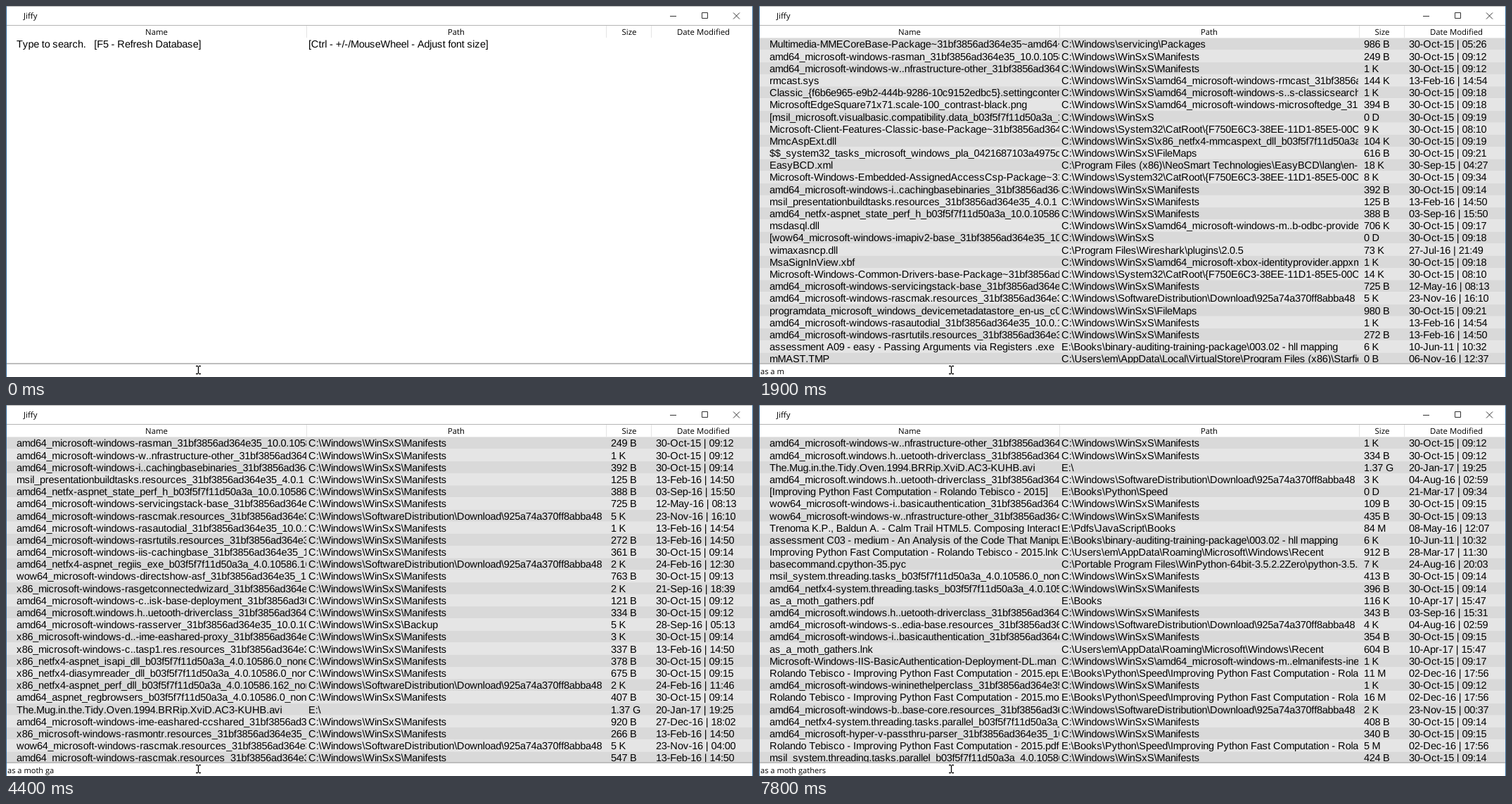
Recreate the animation shown at these times as an HTML page. Size 1062 px wide and 527 px high, loop 8000 ms.

```html
<!DOCTYPE html>
<html lang="en">
<head>
<meta charset="utf-8">
<title>Jiffy</title>
<style>
html, body { margin: 0; width: 100%; height: 100%; overflow: hidden; background: #fff; }
#stage { position: relative; width: 1062px; height: 527px; overflow: hidden; background: #fff; color: #000;
  font: 11.4px/16px "Open Sans", "Noto Sans", sans-serif; text-rendering: geometricPrecision; }
#stage * { position: absolute; white-space: pre; }
#title { left: 25px; top: 7px; }
#head span { top: 30px; transform: translateX(-50%); }
#head i { top: 28px; width: 1px; height: 17px; background: #e4e4e4; }
.list { display: none; font: 14.52px "Liberation Sans", Arial, sans-serif; font-kerning: none; }
#split { left: 1px; top: 507px; width: 1060px; height: 2px; background: #bebebe; }
#query { left: 2px; top: 512px; font-size: 11.1px; }
#caret { left: 100%; top: -1px; width: 1px; height: 16px; background: #000; }
svg { left: 0; top: 0; }
</style>
</head>
<body>
<div id="stage">
  <div id="title">Jiffy</div>
  <div id="head">
    <span style="left:214px">Name</span><span style="left:640px">Path</span>
    <span style="left:886px">Size</span><span style="left:991.5px">Date Modified</span>
    <i style="left:427px"></i><i style="left:853px"></i><i style="left:917px"></i>
  </div>
  <div id="lists"></div>
  <div id="split"></div>
  <div id="query"><span id="typed" style="position:static"></span><b id="caret"></b></div>
  <svg width="1062" height="527" fill="none">
    <path d="M0 .5H1062M0 27.5H1062" stroke="#b4b4b4"/>
    <path d="M.5 0V527M1061.5 0V527" stroke="#3a6f9f"/>
    <path d="M944 14.5h9M989.5 9.5h8v8h-8zM1034 9.5l9 9M1043 9.5l-9 9" stroke="#333"/>
    <path d="M270 511.5h3M274 511.5h3M273.5 512v10M270 522.5h3M274 522.5h3" stroke="#000" stroke-width="1.3"/>
  </svg>
</div>
<script>
const LOOP = 8000, TOP = 45.4, PITCH = 17.19, BASELINE = 14, VISIBLE = 27;
const COLUMNS = [[15, 412], [430, 422], [860, 57], [924, 137]]; // left, width
const QUERY = 'as a moth gathers';
const PATHS = {
  W: String.raw`C:\Windows\WinSxS`,
  M: String.raw`C:\Windows\WinSxS\Manifests`,
  F: String.raw`C:\Windows\WinSxS\FileMaps`,
  B: String.raw`C:\Windows\WinSxS\Backup`,
  P: String.raw`C:\Windows\servicing\Packages`,
  D: String.raw`C:\Windows\SoftwareDistribution\Download\925a74a370ff8abba48`,
  C: String.raw`C:\Windows\System32\CatRoot\{F750E6C3-38EE-11D1-85E5-00C0`,
  R: String.raw`C:\Users\em\AppData\Roaming\Microsoft\Windows\Recent`,
  H: String.raw`E:\Books\binary-auditing-training-package\003.02 - hll mapping`,
  S: String.raw`E:\Books\Python\Speed\Improving Python Fast Computation - Rolando`
};

// Shorthands: a- amd64_microsoft-windows-, w- wow64_..., x- x86_..., # and @ component keys
const longName = s => s
  .replace(/^(\[?)([awx])-/, (_, open, k) => open + { a: 'amd64', w: 'wow64', x: 'x86' }[k] + '_microsoft-windows-')
  .replace(/#$/, '#_10.0.10586.0_none')
  .replace('#', '31bf3856ad364e35')
  .replace('@', 'b03f5f7f11d50a3a');

const parse = text => text.trim().split('\n').map(line => {
  const [name, path, size, date] = line.split(';');
  return [longName(name), PATHS[path] || path, size, date.replace(' ', ' | ')];
});

const one = parse(String.raw`
7d894dfd8d81e213410da682440b3523ea660408cb0ba10330863f;C:\Windows\WinSxS\Catalogs;9 K;30-Oct-15 07:54
Microsoft-OneCore-CoreSystem-mincore-Package~#;C;8 K;30-Oct-15 08:59
Multimedia-MMECoreBase-Package~#~amd64~~10;P;986 B;30-Oct-15 05:26
Package_2048_for_KB3192441~#~amd64~~10.0;C;9 K;09-Oct-16 10:05
Package_3533_for_KB3205386~#~amd64~~10.0;C;10 K;23-Nov-16 20:12
TOTALCMD64.EXE;C:\Program Files\totalcmd;7 M;17-Sep-15 18:52
[humanize];C:\Python27\Lib\site-packages;0 D;13-Jan-17 17:20
amd64_6863eb7d8f9c7f0db600bb68f087ce36_#;M;157 B;14-Aug-16 19:43
amd64_bdb96edc1168898c9f429c8522204f72_#;M;149 B;27-Dec-16 18:01
amd64_da0db17d76ff074912bbbeb5145be936_#;M;148 B;21-Sep-16 18:38
a-d..lient-adm.resources_#;M;294 B;13-Feb-16 14:50
a-directui.resources_#;M;338 B;30-Oct-15 09:13
a-f..e-microsoftjhenghei_#;B;378 B;30-Oct-15 09:21
a-m..iagnostic.resources_#;D;3 K;30-Oct-16 01:03
a-p..oyment-languagepack_#;M;447 B;13-Feb-16 14:49
chartv.dll.mui;C:\Windows\WinSxS\wow64_microsoft-windows-c..w-control.resources;3 K;13-Feb-16 14:51
family.js;C:\Windows\WinSxS\amd64_microsoft-windows-c..riencehost.appxmain;1 K;30-Oct-15 09:18
http_cdn.districtm.ca_0.localstorage-journal;C:\Users\em\AppData\Roaming\Opera Software\Opera Stable\Local Storage;0 B;07-Oct-16 23:12
iterators.h;C:\Python27\Lib\site-packages\nuitka\build\include\nuitka\helper;7 K;25-Jan-17 09:24
libmciseq.a;C:\TDM-GCC-64\x86_64-w64-mingw32\lib;2 K;25-Jun-15 18:57
libmsado15.a;C:\TDM-GCC-64\x86_64-w64-mingw32\lib;15 K;25-Jun-15 18:57
math.pxd;C:\Python27\Lib\site-packages\Cython\Includes\numpy;5 K;06-Jan-17 23:00
part_plan.mod;C:\Downloads\install\i386-efi;1 K;29-Apr-16 16:10
w-b..iagnostic.resources_#;M;350 B;30-Oct-15 09:13
w-t..lservices-workspace_#;M;5 K;30-Oct-15 09:14
x-msident_#;M;338 B;30-Oct-15 09:13
7.07_weather_reporter.py;E:\Books\Python\Tkinter\Button Grid Workbench Sketches Volume Two;7 K;23-Oct-15 22:06`);

const two = parse(String.raw`
Multimedia-MMECoreBase-Package~#~amd64~~10;P;986 B;30-Oct-15 05:26
a-rasman_#;M;249 B;30-Oct-15 09:12
a-w..nfrastructure-other_#;M;1 K;30-Oct-15 09:12
rmcast.sys;C:\Windows\WinSxS\amd64_microsoft-windows-rmcast_31bf3856ad;144 K;13-Feb-16 14:54
Classic_{f6b6e965-e9b2-444b-9286-10c9152edbc5}.settingcontent;C:\Windows\WinSxS\amd64_microsoft-windows-s..s-classicsearch_;1 K;30-Oct-15 09:18
MicrosoftEdgeSquare71x71.scale-100_contrast-black.png;C:\Windows\WinSxS\amd64_microsoft-windows-microsoftedge_31bf;394 B;30-Oct-15 09:18
[msil_microsoft.visualbasic.compatibility.data_@_10;W;0 D;30-Oct-15 09:19
Microsoft-Client-Features-Classic-base-Package~#;C;9 K;30-Oct-15 08:10
MmcAspExt.dll;C:\Windows\WinSxS\x86_netfx4-mmcaspext_dll_b03f5f7f11d50a3a_4;104 K;30-Oct-15 09:19
$$_system32_tasks_microsoft_windows_pla_0421687103a4975c;F;616 B;30-Oct-15 09:21
EasyBCD.xml;C:\Program Files (x86)\NeoSmart Technologies\EasyBCD\lang\en-US;18 K;30-Sep-15 04:27
Microsoft-Windows-Embedded-AssignedAccessCsp-Package~#;C;8 K;30-Oct-15 09:34
a-i..cachingbasebinaries_#;M;392 B;30-Oct-15 09:14
msil_presentationbuildtasks.resources_#_4.0.1;M;125 B;13-Feb-16 14:50
amd64_netfx-aspnet_state_perf_h_@_10.0.10586.0;M;388 B;03-Sep-16 15:50
msdasql.dll;C:\Windows\WinSxS\amd64_microsoft-windows-m..b-odbc-provider;706 K;30-Oct-15 09:17
[w-imapiv2-base_#;W;0 D;30-Oct-15 09:18
wimaxasncp.dll;C:\Program Files\Wireshark\plugins\2.0.5;73 K;27-Jul-16 21:49
MsaSignInView.xbf;C:\Windows\WinSxS\amd64_microsoft-xbox-identityprovider.appxm;1 K;30-Oct-15 09:18
Microsoft-Windows-Common-Drivers-base-Package~#;C;14 K;30-Oct-15 08:10
a-servicingstack-base_#;M;725 B;12-May-16 08:13
a-rascmak.resources_#;D;5 K;23-Nov-16 16:10
programdata_microsoft_windows_devicemetadatastore_en-us_c0;F;980 B;30-Oct-15 09:21
a-rasautodial_#;M;1 K;13-Feb-16 14:54
a-rasrtutils.resources_#;M;272 B;13-Feb-16 14:50
assessment A09 - easy - Passing Arguments via Registers .exe;H;6 K;10-Jun-11 10:32
mMAST.TMP;C:\Users\em\AppData\Local\VirtualStore\Program Files (x86)\Starfield;0 B;06-Nov-16 12:37`);

const kept = [1, 2, 12, 13, 14, 20, 21, 23, 24].map(i => two[i]);
const film = 'The.Mug.in.the.Tidy.Oven.1994.BRRip.XviD.AC3-KUHB.avi;E:\\;1.37 G;20-Jan-17 19:25';
const four = kept.concat(parse(String.raw`
a-iis-cachingbase_#;M;361 B;30-Oct-15 09:14
amd64_netfx4-aspnet_regiis_exe_@_4.0.10586.162;D;2 K;24-Feb-16 12:30
w-directshow-asf_#;M;763 B;30-Oct-15 09:13
x-rasgetconnectedwizard_#;M;2 K;21-Sep-16 18:39
a-c..isk-base-deployment_#;M;121 B;30-Oct-15 09:12
amd64_microsoft.windows.h..uetooth-driverclass_#;M;334 B;30-Oct-15 09:12
manageSingleRole.aspx.resx;C:\Windows\WinSxS\amd64_netfx-aspnet_webadmin_roles_res_b03f;1 K;30-Mar-15 17:50
a-rasserver_#;B;5 K;28-Sep-16 05:13
x-d..-ime-eashared-proxy_#;M;3 K;30-Oct-15 09:14
x-c..tasp1.res.resources_#;M;337 B;13-Feb-16 14:50
x86_netfx4-aspnet_isapi_dll_@_4.0.10586.0_none_;M;378 B;30-Oct-15 09:15
x86_netfx4-diasymreader_dll_@_4.0.10586.0_none_;M;675 B;30-Oct-15 09:15
x86_netfx4-aspnet_perf_dll_@_4.0.10586.162_none;D;2 K;24-Feb-16 11:46
amd64_aspnet_regbrowsers_@_4.0.10586.0_none_;M;407 B;30-Oct-15 09:14
${film}
a-ime-eashared-ccshared_#;M;920 B;27-Dec-16 18:02
managePermissions.aspx;C:\Windows\WinSxS\x86_netfx-aspnet_webadmin_permissions_b03f;4 K;29-Sep-16 19:24
x-rasmontr.resources_#;M;266 B;13-Feb-16 14:50`));

const three = [...four.slice(0, 5), two[17], ...four.slice(5, 9), two[26], ...four.slice(9)].slice(0, VISIBLE);

const five = four.filter(r => !r[0].startsWith('manage')).concat(parse(`
w-rascmak.resources_#;D;5 K;23-Nov-16 04:00
a-rascmak.resources_#;M;547 B;13-Feb-16 14:50`));

const book = 'Improving Python Fast Computation', author = 'Rolando Tebisco';
const six = parse(String.raw`
a-w..nfrastructure-other_#;M;1 K;30-Oct-15 09:12
amd64_microsoft.windows.h..uetooth-driverclass_#;M;334 B;30-Oct-15 09:12
${film}
amd64_microsoft.windows.h..uetooth-driverclass_#;D;3 K;04-Aug-16 02:59
[${book} - ${author} - 2015];E:\Books\Python\Speed;0 D;21-Mar-17 09:34
w-i..basicauthentication_#;M;109 B;30-Oct-15 09:15
w-w..nfrastructure-other_#;M;435 B;30-Oct-15 09:13
Trenoma K.P., Baldun A. - Calm Trail HTML5. Composing Interactive;E:\Pdfs\JavaScript\Books;84 M;08-May-16 12:07
assessment C03 - medium - An Analysis of the Code That Manipulates;H;6 K;10-Jun-11 10:32
${book} - ${author} - 2015.lnk;R;912 B;28-Mar-17 11:30
basecommand.cpython-35.pyc;C:\Portable Program Files\WinPython-64bit-3.5.2.2Zero\python-3.5.2;7 K;24-Aug-16 20:03
msil_system.threading.tasks_@_4.0.10586.0_none_;M;413 B;30-Oct-15 09:14
amd64_netfx4-system.threading.tasks_@_4.0.10586;M;396 B;30-Oct-15 09:14
as_a_moth_gathers.pdf;E:\Books;116 K;10-Apr-17 15:47
amd64_microsoft.windows.h..uetooth-driverclass_#;M;343 B;03-Sep-16 15:31
a-s..edia-base.resources_#;D;4 K;04-Aug-16 02:59
a-i..basicauthentication_#;M;354 B;30-Oct-15 09:15
as_a_moth_gathers.lnk;R;604 B;10-Apr-17 15:47
Microsoft-Windows-IIS-BasicAuthentication-Deployment-DL.man;C:\Windows\WinSxS\amd64_microsoft-windows-m..elmanifests-inet;1 K;30-Oct-15 09:17
${author} - ${book} - 2015.epub;S;11 M;02-Dec-16 17:56
a-wininethelperclass_#;M;1 K;30-Oct-15 09:12
${author} - ${book} - 2015.mobi;S;16 M;02-Dec-16 17:56
a-b..base-core.resources_#;D;2 K;23-Nov-15 00:37
amd64_netfx4-system.threading.tasks.parallel_@_4;M;408 B;30-Oct-15 09:14
amd64_microsoft-hyper-v-passthru-parser_#;M;340 B;30-Oct-15 09:15
${author} - ${book} - 2015.pdf;S;5 M;02-Dec-16 17:56
msil_system.threading.tasks.parallel_@_4.0.10586;M;424 B;30-Oct-15 09:14`);

const hint = [['Type to search.\u00a0\u00a0\u00a0[F5 - Refresh Database]', '[Ctrl - +/-/MouseWheel - Adjust font size]', '', '']];

const $ = id => document.getElementById(id);
const add = (parent, tag, attrs) => {
  const el = parent.appendChild(document.createElementNS('http://www.w3.org/2000/svg', tag));
  for (const key in attrs) el.setAttribute(key, attrs[key]);
  return el;
};

// The list text has whole-pixel glyph advances at 15px, shown slightly reduced.
const SCALE = 0.968;
const pen = document.createElement('canvas').getContext('2d');
pen.font = '15px "Liberation Sans", Arial, sans-serif';
const advances = {};
const advance = c => advances[c] ??= Math.round(pen.measureText(c).width) * SCALE;
const glyphStarts = text => {
  let x = 0;
  return [...text].map(c => {
    const start = x.toFixed(2);
    x += advance(c);
    return start;
  }).join(' ');
};

const views = [hint, one, two, three, four, five, six].map(rows => {
  const view = add($('lists'), 'svg', { class: 'list', width: 1062, height: 507 });
  if (rows !== hint) rows.forEach((_, i) => add(view, 'rect', {
    x: 1, y: TOP + i * PITCH, width: 1060, height: PITCH + 0.1, fill: i % 2 ? '#e5e5e5' : '#d9d9d9'
  }));
  COLUMNS.forEach(([x, width], col) => {
    const column = add(view, 'svg', { x, width, height: 507 });
    rows.forEach((cells, i) => {
      const y = TOP + i * PITCH + BASELINE;
      add(column, 'text', { x: glyphStarts(cells[col]), y }).textContent = cells[col];
    });
  });
  return view;
});

// time, letters typed, caret shown, list shown
const STEPS = [
  [0, 0, 0, 0], [200, 0, 1, 0], [500, 1, 1, 0], [600, 1, 1, 1], [700, 2, 1, 1], [800, 3, 1, 2],
  [1100, 4, 1, 2], [1300, 5, 1, 2], [1600, 6, 1, 2], [1900, 6, 0, 2], [2000, 7, 1, 2], [2100, 7, 1, 3],
  [2300, 8, 1, 3], [2600, 9, 0, 4], [2900, 9, 1, 4], [3100, 10, 1, 4], [3300, 11, 1, 4], [3500, 11, 1, 5],
  [3800, 12, 1, 5], [4400, 12, 0, 5], [4700, 12, 1, 5], [5000, 13, 1, 5], [5300, 14, 1, 5],
  [5500, 15, 1, 5], [5700, 16, 1, 5], [6200, 16, 0, 6], [6400, 17, 1, 6], [6900, 17, 0, 6],
  [7200, 17, 1, 6], [7800, 17, 0, 6]
];

let shown;
function draw() {
  const t = performance.now() % LOOP;
  const step = STEPS.filter(s => s[0] <= t).pop();
  if (step !== shown) {
    shown = step;
    const [, letters, caret, list] = step;
    $('typed').textContent = QUERY.slice(0, letters);
    $('caret').style.visibility = caret ? 'visible' : 'hidden';
    views.forEach((v, i) => { v.style.display = i === list ? 'block' : 'none'; });
  }
  requestAnimationFrame(draw);
}
draw();
</script>
</body>
</html>
```
